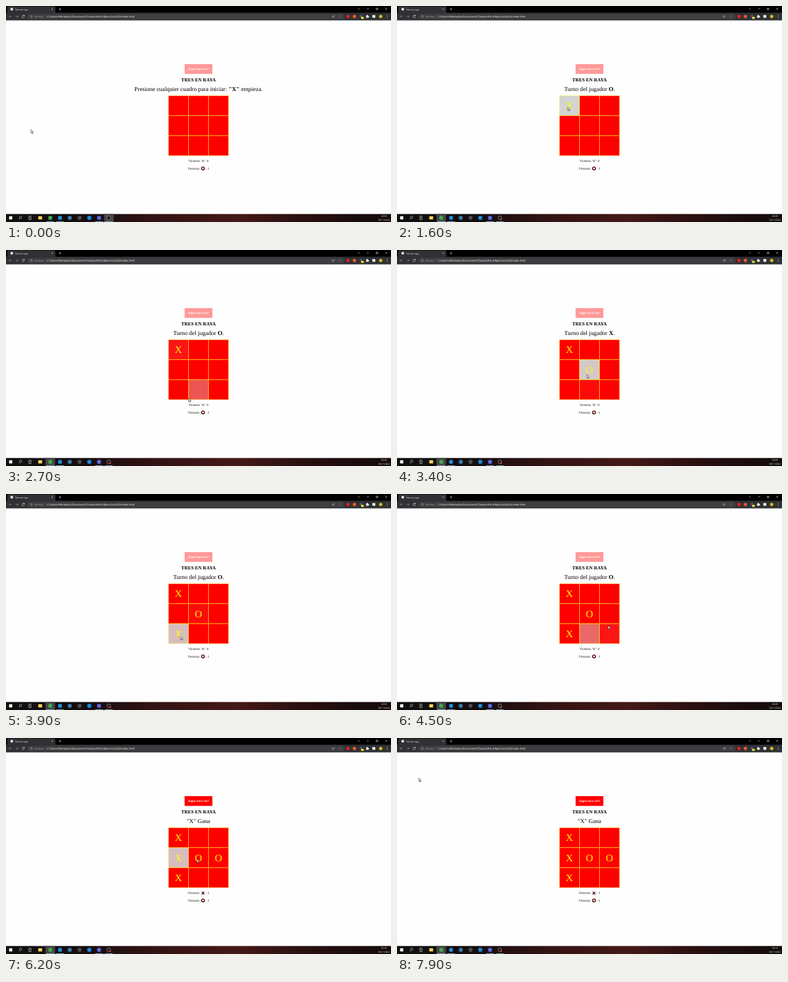
Recreate the animation shown at these times as an HTML page with a canvas. Size 600 by 338 pixels, loop 8000 ms.

```html
<!DOCTYPE html>
<html lang="es">
<head>
<meta charset="utf-8">
<title>Tres en raya</title>
<style>
html, body { margin: 0; width: 100%; height: 100%; overflow: hidden; background: #fefefe; }
canvas { display: block; width: 600px; height: 338px; }
</style>
</head>
<body>
<canvas id="stage"></canvas>
<script>
const canvas = document.getElementById('stage');
const g = canvas.getContext('2d');
const ratio = window.devicePixelRatio || 1;
canvas.width = 600 * ratio;
canvas.height = 338 * ratio;

const LOOP = 8000, STEP = 100, FADE = 400, TRAVEL = 300;
const CELL = 31.25, LEFT = 253.1, TOP = 140.4;
const SERIF = '"Liberation Serif", serif';
const SANS = '"Open Sans", sans-serif';
const CLOCK_TICK = 4700;

// Arrival time and place; the pointer rests until TRAVEL ms before each arrival
const stops = [
  [0, 39, 193.5], [200, 115, 192], [700, 266, 158], [2560, 286, 225],
  [2700, 284.6, 232], [3100, 300, 192], [3400, 296, 195], [3700, 268, 215],
  [4100, 280, 238], [4450, 314, 218], [4500, 329, 206], [4700, 330, 190],
  [4900, 352, 205], [5080, 300, 240], [5300, 272, 194], [6400, 348, 180],
  [6800, 268, 155], [7300, 224, 129], [7800, 24, 68], [7900, 34, 62.5]
];

// Each click marks the cell under the pointer, X and O in turn
const clicks = [1600, 3300, 3800, 4700, 5800];
const WIN = clicks[clicks.length - 1];

const clamp = v => Math.max(0, Math.min(1, v));
const mix = (a, b, k) => a + (b - a) * k;

function pointerAt(t) {
  const next = stops.findIndex(s => s[0] > t);
  if (next < 0) return stops[stops.length - 1].slice(1);
  const [t0, x0, y0] = stops[next - 1], [t1, x1, y1] = stops[next];
  const leave = Math.max(t0, t1 - TRAVEL);
  const k = clamp((t - leave) / (t1 - leave));
  return [mix(x0, x1, k), mix(y0, y1, k)];
}

function cellAt(t) {
  const [x, y] = pointerAt(t);
  const col = Math.floor((x - LEFT) / CELL), row = Math.floor((y - TOP) / CELL);
  return col >= 0 && col < 3 && row >= 0 && row < 3 ? row * 3 + col : -1;
}

const cellCorner = i => [LEFT + i % 3 * CELL, TOP + Math.floor(i / 3) * CELL];
const marked = clicks.map(cellAt);

// Hover strength of every cell; after the win only the winning cell stays lit
function hoverAt(t) {
  const glow = Array(9).fill(0), dt = 20;
  for (let s = 0; s < t; s += dt) {
    const over = cellAt(s);
    for (let i = 0; i < 9; i++) {
      const lit = i === over && (s < WIN || i === cellAt(WIN));
      glow[i] = clamp(glow[i] + (lit ? dt : -dt) / FADE);
    }
    if (s > WIN && over !== cellAt(WIN)) glow[cellAt(WIN)] = clamp(glow[cellAt(WIN)]);
  }
  return glow;
}

function rect(x, y, w, h, color, radius = 0) {
  g.fillStyle = color;
  g.beginPath();
  g.roundRect(x, y, w, h, radius);
  g.fill();
}

function disc(x, y, r, color) {
  g.fillStyle = color;
  g.beginPath();
  g.arc(x, y, r, 0, 7);
  g.fill();
}

function ring(x, y, r, color, width, from = 0, to = 7) {
  g.strokeStyle = color;
  g.lineWidth = width;
  g.beginPath();
  g.arc(x, y, r, from, to);
  g.stroke();
}

function frame(x, y, w, h, color, width) {
  g.strokeStyle = color;
  g.lineWidth = width;
  g.strokeRect(x, y, w, h);
}

function line(color, width, ...points) {
  g.strokeStyle = color;
  g.lineWidth = width;
  g.beginPath();
  points.forEach(p => g.lineTo(...p));
  g.stroke();
}

function cross(x, y, r, color, width) {
  line(color, width, [x - r, y - r], [x + r, y + r]);
  line(color, width, [x - r, y + r], [x + r, y - r]);
}

function text(str, x, y, size, color = '#000', family = SERIF, align = 'left', weight = '') {
  g.font = `${weight} ${size}px ${family}`;
  g.textAlign = align;
  g.fillStyle = color;
  g.fillText(str, x, y);
}

// Centred line whose odd parts are bold
function richLine(parts, y, size) {
  const weight = i => i % 2 ? 'bold' : '';
  const widths = parts.map((part, i) => {
    g.font = `${weight(i)} ${size}px ${SERIF}`;
    return g.measureText(part).width;
  });
  let x = 300 - widths.reduce((a, b) => a + b) / 2;
  parts.forEach((part, i) => {
    text(part, x, y, size, '#000', SERIF, 'left', weight(i));
    x += widths[i];
  });
}

function drawBrowser() {
  rect(0, 0, 600, 11, '#000');
  rect(2, 0.5, 75, 12, '#303134', 2);
  rect(0, 10.5, 600, 11.9, '#303134');
  rect(33, 12, 495, 9, '#3e3e40', 4.5);

  disc(9, 5, 2.2, '#ddd');
  text('Tres en raya', 14, 6.5, 3.6, '#fff', SANS);
  cross(72, 5, 1.1, '#ddd', 0.5);
  line('#ddd', 0.6, [82.5, 5], [86, 5]);
  line('#ddd', 0.6, [84.2, 3.3], [84.2, 6.7]);

  line('#ddd', 0.6, [548.6, 3.8], [550, 5.2], [551.4, 3.8]);
  line('#ddd', 0.6, [562.5, 4.5], [565.5, 4.5]);
  frame(577, 3.4, 2.4, 2.4, '#ddd', 0.6);
  cross(592.5, 4.5, 1.4, '#ddd', 0.6);

  for (const [x, way] of [[7, 1], [17, -1]]) {
    line('#888', 0.7, [x - 2 * way, 16.3], [x + 2 * way, 16.3]);
    line('#888', 0.7, [x, 14.3], [x - 2 * way, 16.3], [x, 18.3]);
  }
  ring(27, 16.3, 1.9, '#ddd', 0.7, 0.4, 5.6);
  rect(27.6, 14.3, 1.6, 1.4, '#ddd');

  ring(39.5, 16.3, 1.7, '#aaa', 0.5);
  line('#aaa', 0.5, [39.5, 15.4], [39.5, 17.3]);
  text('Archivo', 44.5, 17.8, 4, '#aaa', SANS);
  line('#777', 0.4, [61.3, 14.3], [61.3, 18.5]);
  text('C:/Users/Marlodon/Documents/Tareas/AULA/Ejercicios/JS3/index.html',
    64, 17.8, 4.2, '#fff', SANS);

  frame(508.5, 15.3, 3, 2.6, '#aaa', 0.5);
  line('#aaa', 0.5, [510, 16.5], [512.6, 14.2]);
  text('☆', 520.5, 18.2, 5.5, '#bbb', '"DejaVu Sans", sans-serif', 'center');
  disc(533, 16.3, 2.6, '#e02020');
  disc(543, 16.3, 2.6, '#f0582c');
  rect(551.5, 14, 3.5, 3.5, '#4a5b78');
  rect(553.5, 17, 4, 3.2, '#f4e22a');
  rect(561.2, 15, 3.6, 3.6, '#eee', 0.5);
  disc(563, 14.7, 0.9, '#eee');
  disc(565, 16.8, 0.9, '#eee');
  rect(571, 14.2, 4.5, 4.2, '#f4f4f4');
  disc(584, 16.3, 2.6, '#d0bd20');
  for (let i = -1; i < 2; i++) disc(594, 16.3 + 1.8 * i, 0.5, '#ddd');
}

function drawTaskbar(t) {
  const shade = g.createLinearGradient(0, 0, 600, 0);
  ['#101011', '#140d0d', '#341313', '#441818', '#260e0e', '#120b0b']
    .forEach((color, i) => shade.addColorStop(i / 5, color));
  rect(0, 325.5, 600, 12.5, shade);

  const recording = t >= 100;
  rect(recording ? 61.5 : 153, 325.5, 15, 12.5, '#464444');

  rect(4.8, 329, 5, 5, '#eee');
  ring(22.8, 330.6, 1.8, '#ddd', 0.6);
  line('#ddd', 0.6, [21.5, 332], [20, 334]);
  frame(35.2, 330.2, 4, 2.8, '#ccc', 0.6);
  for (const y of [328.8, 334.4]) line('#ccc', 0.6, [35, y], [39.5, y]);
  rect(50.3, 329, 6, 5, '#f6cf58', 0.5);

  const apps = ['#3fa650', '#2489d8', '#3a78a8', '#4a4a4c', '#1689e0', '#5965e8', '#8c8c8e'];
  apps.forEach((color, i) => disc(69 + 15.2 * i, 331.5, 3.2, color));
  disc(160.2, 331.5, 2.6, '#1d1d20');
  if (recording) disc(162.2, 333.4, 1.5, '#e02828');
  for (const i of [0, 1, 5, 6]) rect(63 + 15.2 * i, 337, 12, 1, '#76a9cf');

  text(t < CLOCK_TICK ? '20:09' : '20:10', 589, 330.2, 3.6, '#fff', SANS, 'center');
  text('30/11/2022', 589, 336, 3.5, '#fff', SANS, 'center');
}

function drawBoard(t) {
  hoverAt(t).forEach((k, i) => {
    const [x, y] = cellCorner(i), fade = mix(0, 211, k);
    rect(x, y, CELL, CELL, `rgb(${mix(255, 211, k)}, ${fade}, ${fade})`);
  });
  for (let i = 0; i < 9; i++) {
    const [x, y] = cellCorner(i);
    frame(x + 0.2, y + 0.2, CELL - 0.4, CELL - 0.4, '#ff0', 0.4);
  }
  clicks.forEach((at, n) => {
    if (t < at) return;
    const [x, y] = cellCorner(marked[n]);
    text(n % 2 ? 'O' : 'X', x + CELL / 2, y + CELL / 2 + 5.4, 15.625, '#ff0', SERIF, 'center');
  });
}

function drawScore(y) {
  text('Victorias', 283.3, y, 5);
  text(': 1', 316.6, y, 5, '#000', SERIF, 'right');
}

function drawPage(t) {
  const won = t >= WIN;
  rect(278.4, 91.1, 43.2, 15.1, won ? '#f00' : '#f99');
  text('Jugar otra vez?', 300, 100.2, 5, '#fff', SERIF, 'center', 'bold');
  text('TRES EN RAYA', 300, 118, 7.5, '#000', SERIF, 'center', 'bold');

  const played = clicks.filter(at => t >= at).length;
  const message = won ? ['"X" Gana']
    : played ? ['Turno del jugador ', played % 2 ? 'O' : 'X', '.']
    : ['Presione cualquier cuadro para iniciar: ', '"X"', ' empieza.'];
  richLine(message, 133.2, 9.375);

  drawBoard(t);

  if (won) {
    drawScore(244.4);
    cross(307, 242.8, 2, '#5c1a14', 1.6);
  } else {
    richLine(['Victorias "', 'x', '": 0'], 244, 5);
  }
  drawScore(256);
  ring(307, 254.2, 2.2, '#641814', 1.6);
}

function drawPointer(t) {
  g.save();
  g.translate(...pointerAt(t));
  g.beginPath();
  [[0, 0], [0, 5.4], [1.2, 4.3], [2, 6.2], [2.9, 5.8], [2.1, 3.9], [3.8, 3.8]]
    .forEach(p => g.lineTo(...p));
  g.closePath();
  g.fillStyle = '#fff';
  g.fill();
  g.strokeStyle = '#222';
  g.lineWidth = 0.6;
  g.stroke();
  g.restore();
}

function draw(now) {
  const t = Math.floor(now % LOOP / STEP) * STEP;
  g.setTransform(ratio, 0, 0, ratio, 0, 0);
  g.textRendering = 'geometricPrecision';
  rect(0, 0, 600, 338, '#fefefe');
  drawBrowser();
  drawPage(t);
  drawTaskbar(t);
  drawPointer(t);
}

const start = performance.now();
function tick() {
  draw(performance.now() - start);
  requestAnimationFrame(tick);
}
tick();
</script>
</body>
</html>
```
